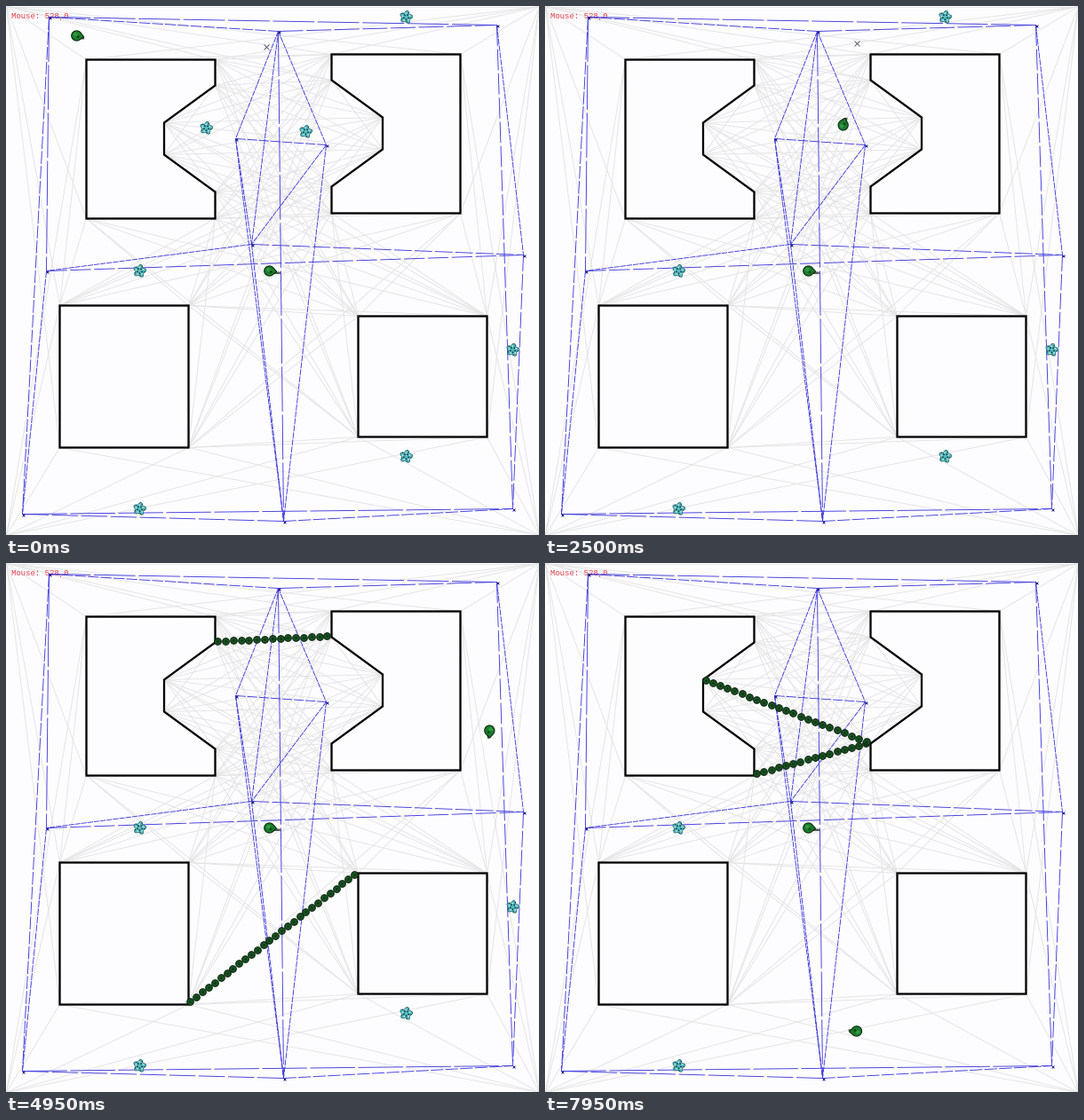
Write a matplotlib script that moves like this. It is 600 by 596 pixels and loops after 8 s.

```python
import itertools
import numpy as np
import matplotlib.pyplot as plt
from matplotlib.animation import FuncAnimation
from matplotlib.collections import LineCollection
from matplotlib.patches import Circle, Polygon
from matplotlib.path import Path
from matplotlib.transforms import Affine2D

W, H, DPI = 600, 596, 100
STEP, LOOP = 50, 8000
PX = 72 / DPI  # points per pixel
SPEED, TURN, REACH = 0.182, 38, 3  # px per ms, ms per corner, px


def box(x, y, w, h):
    return [(x, y), (x + w, y), (x + w, y + h), (x, y + h)]


NOTCHED = [(90, 60), (235, 60), (235, 89), (177.5, 131),
           (177.5, 167), (235, 209), (235, 239), (90, 239)]
MIRRORED = [(601 - x, y - 6) for x, y in NOTCHED]
LOWER_LEFT, LOWER_RIGHT = box(60, 337, 145, 160), box(396, 349, 145, 136)
WALLS = [NOTCHED, MIRRORED, LOWER_LEFT, LOWER_RIGHT]
BORDER = box(0, 0, W, H)
NODES = [(48, 12), (306, 28), (552, 21), (258, 149), (360, 156), (276, 268),
         (45, 298), (582, 280), (18, 572), (312, 580), (570, 566)]

# stops of the walking soldier; True where an item is picked up
START = (79, 33)
STOPS = [((292, 45), False), ((225, 137), True), ((337, 141), True),
         ((350, 41), False), ((450, 12), True), ((527, 40), False),
         ((570, 387), True), ((556, 506), False), ((450, 507), True),
         ((150, 566), True)]

# start time and the two barriers shown from then on
TOP = NOTCHED[2], MIRRORED[2]
LOW = NOTCHED[6], MIRRORED[5]
BARRIERS = [
    (2600, TOP, (BORDER[3], LOWER_LEFT[2])),
    (3500, TOP, (LOWER_LEFT[2], LOWER_RIGHT[0])),
    (5100, TOP, (MIRRORED[2], LOWER_LEFT[1])),
    (6300, LOW, (NOTCHED[4], LOWER_RIGHT[1])),
    (7600, LOW, (NOTCHED[3], MIRRORED[5])),
]

fig = plt.figure(figsize=(W / DPI, H / DPI), dpi=DPI, facecolor="#fdfcfe")
ax = fig.add_axes([0, 0, 1, 1])
ax.set_xlim(-0.5, W - 0.5)
ax.set_ylim(H - 0.5, -0.5)
ax.axis("off")


def visible_pairs(points):
    paths = [Path(w + w[:1], closed=True) for w in WALLS]
    mix = np.linspace(0.005, 0.995, 200)[:, None]
    pairs = []
    for a, b in itertools.combinations(points, 2):
        line = np.array(a) * (1 - mix) + np.array(b) * mix
        if a[0] != b[0] and not any(p.contains_points(line).any() for p in paths):
            pairs.append((a, b))
    return pairs


def draw_static():
    corners = sum(WALLS, []) + BORDER
    ax.add_collection(LineCollection(visible_pairs(corners), colors="#e4e4e4",
                                     linewidths=0.9 * PX, zorder=1))
    for w in WALLS:
        ax.add_patch(Polygon(w, fill=False, ec="black", lw=2.3 * PX,
                             snap=False, zorder=2))
    ax.text(6, 14, "Mouse: 528,0", color="#e0404c", family="Liberation Mono",
            size=9 * PX, va="baseline", zorder=3)
    for a, b in visible_pairs(NODES):
        dx, dy = abs(a[0] - b[0]), abs(a[1] - b[1])
        # flat lines break where they step to the next pixel row
        run = np.clip(max(dx, dy) / max(1, min(dx, dy)), 8, 60)
        gap = min(0.14 * run, 4)
        ax.plot(*zip(a, b), color="#3d38dc", lw=0.9 * PX, zorder=4, snap=False,
                ls=(0, (run - gap, gap)), dash_capstyle="butt")
    ax.plot(*zip(*NODES), ls="", marker="x", ms=3 * PX, mew=0.8 * PX,
            color="#22208c", zorder=4)


def ring(count, radius, turn):
    a = 2 * np.pi * np.arange(count) / count + turn
    return np.c_[radius * np.cos(a), radius * np.sin(a)]


def make_item(x, y):
    a = np.linspace(0, 2 * np.pi, 60)
    r = 6.1 + 1.2 * np.cos(5 * a + 0.6)
    parts = [Polygon(np.c_[r * np.cos(a), r * np.sin(a)], fc="#56bcc0",
                     ec="#2a6a70", lw=0.8 * PX)]
    parts += [Circle(p, 1.0, fc="#16434a") for p in ring(5, 2.8, 0.35)]
    parts += [Circle(p, 1.0, fc="#a5e6e6") for p in ring(5, 4.2, 0.85)]
    parts += [Circle(p, 0.7, fc="#16434a") for p in ring(5, 5.6, 0.2)]
    for p in parts:
        p.set_zorder(6)
        ax.add_patch(p)
    place(parts, x, y, 0)
    return parts


def make_soldier(gun):
    a = np.linspace(0.65, 2 * np.pi - 0.65, 30)
    drop = np.vstack([np.c_[5.8 * np.cos(a), 5.6 * np.sin(a)], [(8.2, 0.8)]])
    parts = [
        Polygon([(2, 1.2), (gun, 1.4), (gun, 3.2), (2, 3.4)],
                fc="#5c665e", ec="#2c332d", lw=0.5 * PX),
        Polygon(drop, fc="#1d7a2c", ec="#0a2c10", lw=1.1 * PX),
        Circle((-1.2, -1.4), 2.3, fc="#2f9a40"),
        Circle((1.6, 1.2), 1.5, fc="#0e4a19"),
    ]
    for p in parts:
        p.set_zorder(9)
        ax.add_patch(p)
    return parts


def place(parts, x, y, angle):
    t = Affine2D().rotate(angle).translate(x, y) + ax.transData
    for p in parts:
        p.set_transform(t)


def plan_route():
    """Key times and points: constant speed, a short halt at each stop."""
    times, points, arrivals = [0], [np.array(START, float)], []
    for stop, _ in STOPS:
        step = np.array(stop) - points[-1]
        dist = np.hypot(*step)
        end = points[-1] + step * (1 - REACH / dist)
        arrivals.append(times[-1] + (dist - REACH) / SPEED)
        times += [arrivals[-1], arrivals[-1] + TURN]
        points += [end, end]
    return np.array(times), np.array(points), arrivals


def position(t):
    return np.array([np.interp(t, times, points[:, k]) for k in (0, 1)])


def chain(a, b, gap=8.8, inset=4, shift=1.2):
    a, b = np.array(a, float), np.array(b, float)
    size = np.hypot(*(b - a))
    n = int(round((size - 2 * inset) / gap)) + 1
    s = np.linspace(inset, size - inset, n)[:, None] / size
    return a + (b - a) * s - shift


def dots(size, **style):
    return ax.plot([], [], ls="", marker="o", ms=size * PX, zorder=8, **style)[0]


draw_static()
times, points, arrivals = plan_route()
items = [(make_item(*stop), when)
         for (stop, pick), when in zip(STOPS, arrivals) if pick]
make_item(150, 298)
place(make_soldier(12), 296, 298, 0)
walker = make_soldier(8.5)
mark, = ax.plot([], [], ls="", marker="x", ms=6 * PX, mew=0.9 * PX,
                color="#505058", zorder=5)
beads = dots(7.6, mew=1.1 * PX, mfc="#1a5423", mec="#0a260e")
cores = dots(2.6, mew=0, mfc="#0c3313")


def update(i):
    t = i * STEP
    dx, dy = position(t + 60) - position(t - 60)
    place(walker, *position(t), np.arctan2(dy, dx))

    x, y = next(stop for (stop, _), when in zip(STOPS, arrivals) if t < when)
    mark.set_data([x], [y])
    for parts, when in items:
        for p in parts:
            p.set_visible(t < when)

    shown = [pair for start, *pair in BARRIERS if t >= start]
    spots = np.vstack([chain(*e) for e in shown[-1]]) if shown else np.empty((0, 2))
    for line in (beads, cores):
        line.set_data(*spots.T)
    return [mark, beads, cores]


anim = FuncAnimation(fig, update, frames=LOOP // STEP, interval=STEP,
                     repeat=True, repeat_delay=0, blit=False)
plt.show()
```
